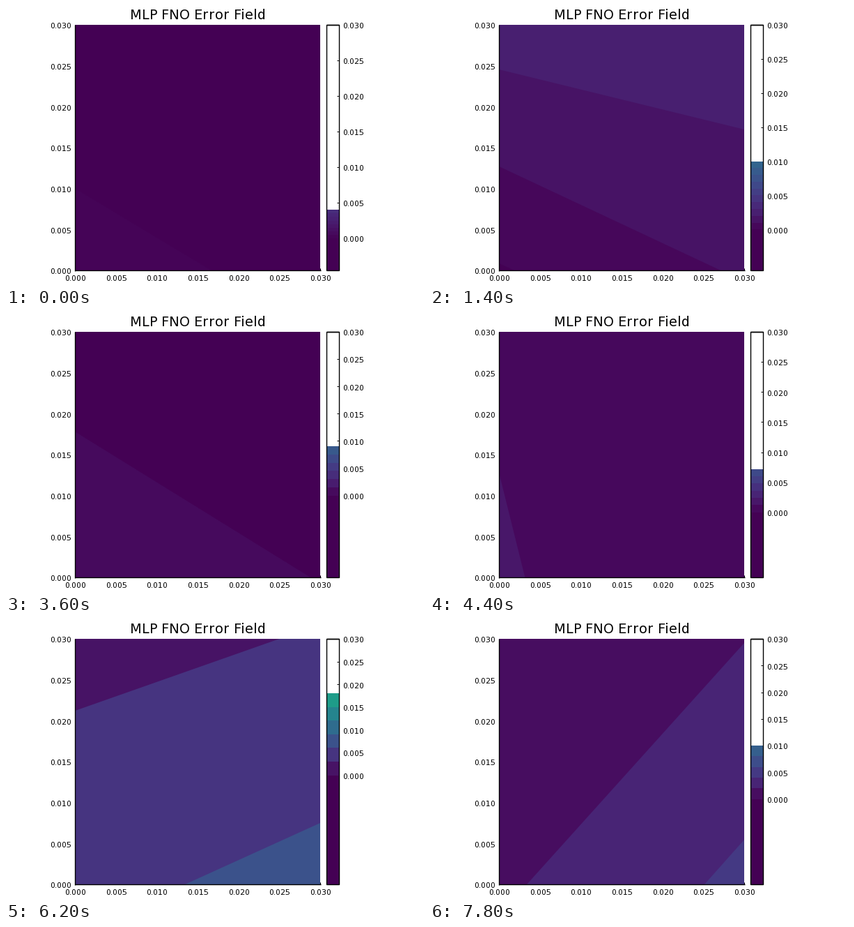
These frames come from a looping animation (600 by 400 pixels, 8 s). A matplotlib script:

```python
from itertools import pairwise

import numpy as np
import matplotlib.pyplot as plt
from matplotlib.animation import FuncAnimation
from matplotlib.collections import PolyCollection

W, H, DPI = 600, 400, 100
FRAMES, INTERVAL = 40, 200
LEFT, RIGHT, TOP, BOTTOM = 99.2, 451, 27, 379
BAR_L, BAR_R = 460, 478
VMAX = 30  # values are in thousandths
TICKS = range(0, VMAX + 1, 5)
DROP = 5.35  # from a tick down to its label's baseline


def pose(frame, mean, dx, dy, step, twist=0, below=8, above=6):
    """Error surface at one moment, and the colour bar's bands around zero."""
    return np.array([frame, mean, dx, dy, twist, step, below, above], float)


POSES = [
    pose(0, -0.42, -0.54, -0.90, 0.5, below=9, above=8),
    pose(7, 1.54, 0.69, 2.04, 1, twist=-1, below=6, above=10),
    pose(12, 2.41, 0.26, 0.66, 1),
    pose(18, -0.22, -0.63, -1.02, 1.5, below=10),
    pose(26, 1.74, -1.05, 0.94, 0.8, twist=0.9, above=7),
    pose(31, 4.36, 1.41, -3.46, 3, twist=-0.6),
    pose(39, 2.10, 2.21, -1.94, 2, twist=-1.1, above=5),
]

# corners anticlockwise from bottom left, as offsets from the centre
U = np.array([-0.5, 0.5, 0.5, -0.5])
V = np.array([-0.5, -0.5, 0.5, 0.5])
CORNERS = np.column_stack([(LEFT + RIGHT) / 2 + U * (RIGHT - LEFT),
                           (TOP + BOTTOM) / 2 - V * (BOTTOM - TOP)])

viridis = plt.get_cmap("viridis")
plt.rcParams["font.family"] = "DejaVu Sans"
plt.rcParams["text.hinting_factor"] = 1  # whole-pixel letter spacing

fig = plt.figure(figsize=(W / DPI, H / DPI), dpi=DPI, facecolor="white")
ax = fig.add_axes([0, 0, 1, 1])
ax.set_xlim(0, W)
ax.set_ylim(H, 0)
ax.axis("off")


def line(xs, ys, width, z):
    return ax.plot(xs, ys, color="black", lw=width * 72 / DPI, zorder=z,
                   solid_capstyle="butt", solid_joinstyle="miter")[0]


def label(x, y, text, ha, size=8):
    return ax.text(x, y, text, ha=ha, va="baseline", fontsize=size, color="black")


def tick_text(value):
    return f"{value / 1000:.3f}"


def band_color(k, step):
    return viridis(float(np.clip((k + 0.5) * step / VMAX, 0, 1)))


def pose_at(frame):
    for a, b in pairwise(POSES):
        if frame <= b[0]:
            return a + (b - a) * (frame - a[0]) / (b[0] - a[0])


def region_above(values, level):
    """Part of the square whose values reach the level."""
    points = []
    for i in range(4):
        j = (i + 1) % 4
        a, b = values[i], values[j]
        if a >= level:
            points.append(CORNERS[i])
        if (a >= level) != (b >= level):
            points.append(CORNERS[i] + (level - a) / (b - a) * (CORNERS[j] - CORNERS[i]))
    return points


# fixed parts
label(275.5, 19, "MLP FNO Error Field", "center", 14)
for t in TICKS:
    x = LEFT + t / VMAX * (RIGHT - LEFT)
    y = BOTTOM - t / VMAX * (BOTTOM - TOP)
    label(x + 0.5, 394.5, tick_text(t), "center")
    label(94.5, y + DROP, tick_text(t), "right")
    line([x, x], [BOTTOM, BOTTOM - 3.5], 1, 1)
    line([LEFT, LEFT + 3.5], [y, y], 1, 1)
line([LEFT, LEFT], [TOP, BOTTOM + 1], 1.4, 4)
line([LEFT, RIGHT + 1], [BOTTOM, BOTTOM], 1.4, 4)
line([BAR_L, BAR_R, BAR_R, BAR_L, BAR_L, BAR_R],
     [TOP, TOP, BOTTOM, BOTTOM, TOP, TOP], 1.4, 4)

# moving parts
field, bar = (ax.add_collection(PolyCollection([], edgecolors="none", zorder=2),
                                autolim=False) for _ in range(2))
bar_ticks = [line([BAR_R - 3, BAR_R], [0, 0], 1, 1) for _ in TICKS]
bar_labels = [label(482.7, 0, tick_text(t), "left") for t in TICKS]


def draw_field(values, step):
    first, last = (int(np.floor(v / step)) for v in (values.min(), values.max()))
    shapes, colors = [CORNERS], [band_color(first, step)]
    for k in range(first + 1, last + 1):
        region = region_above(values, k * step)
        if len(region) > 2:
            shapes.append(region)
            colors.append(band_color(k, step))
    field.set_verts(shapes)
    field.set_facecolor(colors)


def draw_bar(step, below, above):
    def bar_y(value):
        return TOP + (VMAX - value) / (VMAX + below * step) * (BOTTOM - TOP)

    # each band runs down to the bottom and the next one covers its lower part
    bands = range(above - 1, -below - 1, -1)
    tops = [round(bar_y((k + 1) * step)) for k in bands]
    bar.set_verts([[(BAR_L, y), (BAR_R, y), (BAR_R, BOTTOM), (BAR_L, BOTTOM)]
                   for y in tops])
    bar.set_facecolor([band_color(k, step) for k in bands])
    for t, mark, text in zip(TICKS, bar_ticks, bar_labels):
        y = bar_y(t)
        mark.set_ydata([y, y])
        text.set_y(y + DROP)


def update(frame):
    _, mean, dx, dy, twist, step, below, above = pose_at(frame)
    step = round(step, 1)
    draw_field(mean + dx * U + dy * V + twist * U * V, step)
    draw_bar(step, round(below), round(above))
    return [field, bar, *bar_ticks, *bar_labels]


anim = FuncAnimation(fig, update, frames=FRAMES, init_func=lambda: update(0),
                     interval=INTERVAL, repeat=True, repeat_delay=0, blit=False)
plt.show()
```
